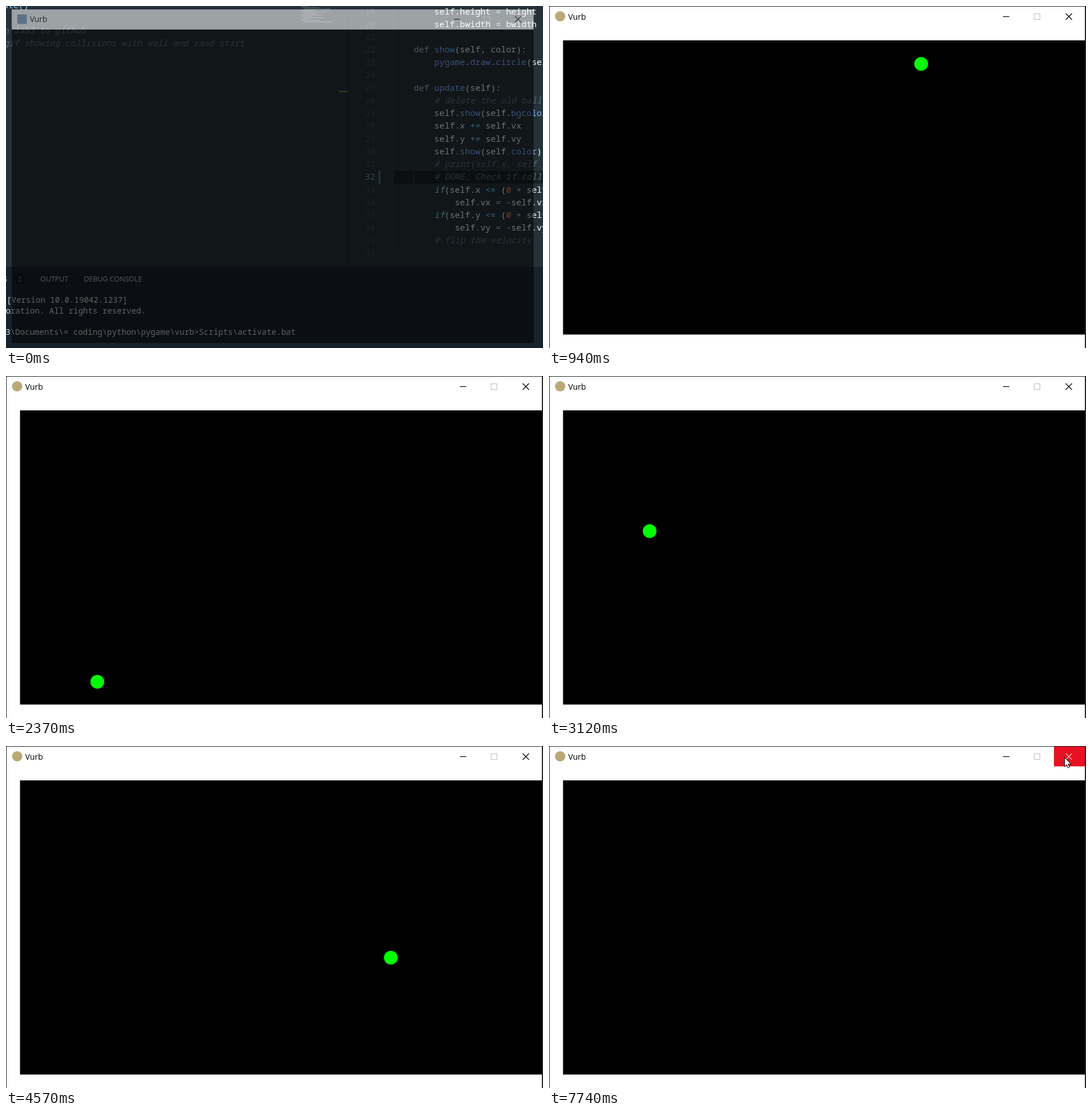
An HTML page with a canvas for the animation above (8000 ms loop, 938 by 597 pixels).

```html
<!DOCTYPE html>
<html lang="en">
<head>
<meta charset="utf-8">
<title>Ball game window</title>
<style>
html, body { margin: 0; width: 100%; height: 100%; overflow: hidden; background: #263238; }
canvas { display: block; }
</style>
</head>
<body>
<canvas id="stage" width="938" height="597"></canvas>
<script>
const ctx = document.getElementById('stage').getContext('2d');
const LOOP = 8000;
const MONO = '"Noto Sans Mono", monospace';
const SANS = '"Open Sans", sans-serif';
const NAME = 'Vurb';

const CODE = `        self.height = height
        self.bwidth = bwidth

    def show(self, color):
        pygame.draw.circle(self.screen

    def update(self):
        # delete the old ball
        self.show(self.bgcolor)
        self.x += self.vx
        self.y += self.vy
        self.show(self.color)
        # print(self.x, self.y)
        # DONE: Check if collided
        if(self.x <= (0 + self.radius
            self.vx = -self.vx
        if(self.y <= (0 + self.radius
            self.vy = -self.vy
        # flip the velocity
`.split('\n');
const TOKEN = /#.*|\bdef\b|\bif\b|\d+|\.color|\b(?:pygame|draw|circle|show|update|bgcolor)\b|[=+<-]+|\w+|\s+|./g;

function tokenColor(s) {
  if (s[0] === '#') return '#546e7a';
  if (s === 'def') return '#a9b4d6';
  if (s === 'if' || /^[=+<-]/.test(s)) return '#89ddff';
  if (/^\d/.test(s)) return '#f78c6c';
  if (/^(\.color|pygame|draw|circle|show|update|bgcolor)$/.test(s)) return '#82aaff';
  return '#eeffff';
}

function rect(color, x, y, w, h) {
  ctx.fillStyle = color;
  ctx.fillRect(x, y, w, h);
}

function disc(color, x, y, r) {
  ctx.fillStyle = color;
  ctx.beginPath();
  ctx.arc(x, y, r, 0, 7);
  ctx.fill();
}

function text(s, x, y, color, font, align = 'left') {
  ctx.font = font;
  ctx.fillStyle = color;
  ctx.textAlign = align;
  ctx.fillText(s, x, y);
}

function line(color, ...points) {
  ctx.strokeStyle = color;
  ctx.beginPath();
  for (let i = 0; i < points.length; i += 4) {
    ctx.moveTo(points[i], points[i + 1]);
    ctx.lineTo(points[i + 2], points[i + 3]);
  }
  ctx.stroke();
}

function drawEditor() {
  const size = '14.92px ' + MONO, italic = 'italic ' + size;
  rect('#263238', 0, 0, 938, 597);
  text('ate()', -5, 4, '#89ddff', size);
  text('n lab3 to github', -4, 47.5, '#546e7a', italic);
  text('gif showing collisions with wall and rand start', -4, 69.5, '#546e7a', italic);

  // minimap, ruler mark and split
  for (let i = 0; i < 12; i++) {
    rect('#62747d', 515 + i % 3 * 3, i * 2.5, 12 + i * 17 % 38, 1);
  }
  rect('#7c7440', 581, 148, 15, 2);
  rect('#1e292e', 597, 0, 1, 455);

  rect('#182126', 676, 288, 262, 22);
  rect('#3f7f9c', 651, 288, 3, 22);
  rect('#2f3c43', 676, 0, 1, 420);
  rect('#2f3c43', 712, 155, 1, 265);
  CODE.forEach((row, i) => {
    const y = 14.5 + i * 22.22;
    text(19 + i, 645, y, i === 13 ? '#78909c' : '#3b4c55', size, 'right');
    let x = 676.5;
    for (const s of row.match(TOKEN) || []) {
      text(s, x, y, tokenColor(s), s[0] === '#' || s === 'if' ? italic : size);
      x += s.length * 8.95;
    }
  });

  rect('#18222a', 0, 455, 938, 142);
  const tab = '12.4px ' + SANS, term = '14.08px ' + MONO;
  text('S', -5, 481, '#ffffff', tab);
  disc('#11191d', 24, 476, 10);
  text('2', 24, 481, '#67777e', tab, 'center');
  text('OUTPUT', 60, 481, '#c0c8cc', tab);
  text('DEBUG CONSOLE', 136, 481, '#c0c8cc', tab);
  text('[Version 10.0.19042.1237]', 1, 518, '#d4d9db', term);
  text('poration. All rights reserved.', -9, 537, '#d4d9db', term);
  text('m3\\Documents\\= coding\\python\\pygame\\' + NAME.toLowerCase() + '>Scripts\\activate.bat',
    506, 574, '#d4d9db', term, 'right');
}

// Window opening: x, y, scale, opacity
const OPENING = [[10, 6, .975, .55], [5, 3, .988, .8], [2, 1, .997, .93], [1, 1, 1, 1]];

function drawWindow(step, hover) {
  const [x, y, scale, alpha] = OPENING[Math.min(step + 1, 3)];
  const ready = step > 2;
  ctx.save();
  if (alpha === 1) {
    rect('#20262a', 0, 0, 938, 1);
    rect('#20262a', 0, 0, 1, 597);
    rect('#20262a', 936, 0, 2, 597);
  }
  ctx.translate(x, y);
  ctx.scale(scale, scale);
  ctx.globalAlpha = alpha;
  rect('#fff', 0, 0, 935, 36);
  rect(ready ? '#fff' : '#000', 0, 36, 935, 561);
  if (ready) rect('#000', 23.5, 59, 911.5, 513.5);

  ctx.globalAlpha = Math.sqrt(alpha);
  if (ready) disc('#b9a977', 18.5, 17, 9);
  else rect('#46617c', 10, 9, 17, 17);
  text(NAME, 32.5, 22.5, '#000', '14px ' + SANS);
  if (hover) rect('#e81123', 881, 0, 54, 34.5);
  ctx.lineWidth = 1.2;
  line('#000', 792, 17.5, 803, 17.5);
  ctx.strokeStyle = '#c8c4b8';
  ctx.strokeRect(846.5, 12.5, 10, 10);
  line(hover ? '#f6c4c8' : '#000', 901.5, 12, 912.5, 23, 912.5, 12, 901.5, 23);
  ctx.restore();
}

const MARKS = [60, 870, 1680, 2510, 3330, 4150, 4970, 5790];

function stepAt(t) {
  if (t < MARKS[0]) return -1;
  t = Math.min(t, 5700);
  const i = MARKS.findIndex(m => m > t) - 1;
  return 12 * i + Math.floor(12 * (t - MARKS[i]) / (MARKS[i + 1] - MARKS[i]) + .1);
}

function drawBall(step) {
  const LEFT = 36.2, TOP = 72, SPAN = 490.6;
  const ticks = 4 * (step - 13) + (step > 42) + (step > 56);
  const moved = 5.84 * ticks;
  const fold = Math.abs(29 + moved) % (2 * SPAN);
  ctx.save();
  ctx.beginPath();
  ctx.rect(0, 0, 936, 597);
  ctx.clip();
  disc('#0f0', LEFT + Math.abs(613.8 - moved), TOP + Math.min(fold, 2 * SPAN - fold), 12);
  ctx.restore();
}

function cursorAt(t) {
  if (t < 6980) return null;
  const p = Math.min(Math.floor((t - 6980) / 69.1 + .1) / 11, 1);
  const e = p * p * (3 - 2 * p);
  return { x: 757 + 143 * e, y: 220 - 200 * e };
}

function drawCursor({ x, y }) {
  ctx.save();
  ctx.translate(x + .5, y);
  ctx.lineWidth = 1;
  ctx.strokeStyle = '#000';
  ctx.fillStyle = '#fff';
  const arrow = new Path2D('M0 0V16L3.7 12.6L6.2 18.2L8.8 17L6.3 11.6H11.4Z');
  ctx.fill(arrow);
  ctx.stroke(arrow);
  ctx.restore();
}

function draw() {
  const t = performance.now() % LOOP;
  const step = stepAt(t), cursor = cursorAt(t);
  drawEditor();
  drawWindow(step, cursor && cursor.x > 882 && cursor.y < 36);
  if (step > 2) drawBall(step);
  if (cursor) drawCursor(cursor);
  requestAnimationFrame(draw);
}
draw();
</script>
</body>
</html>
```
